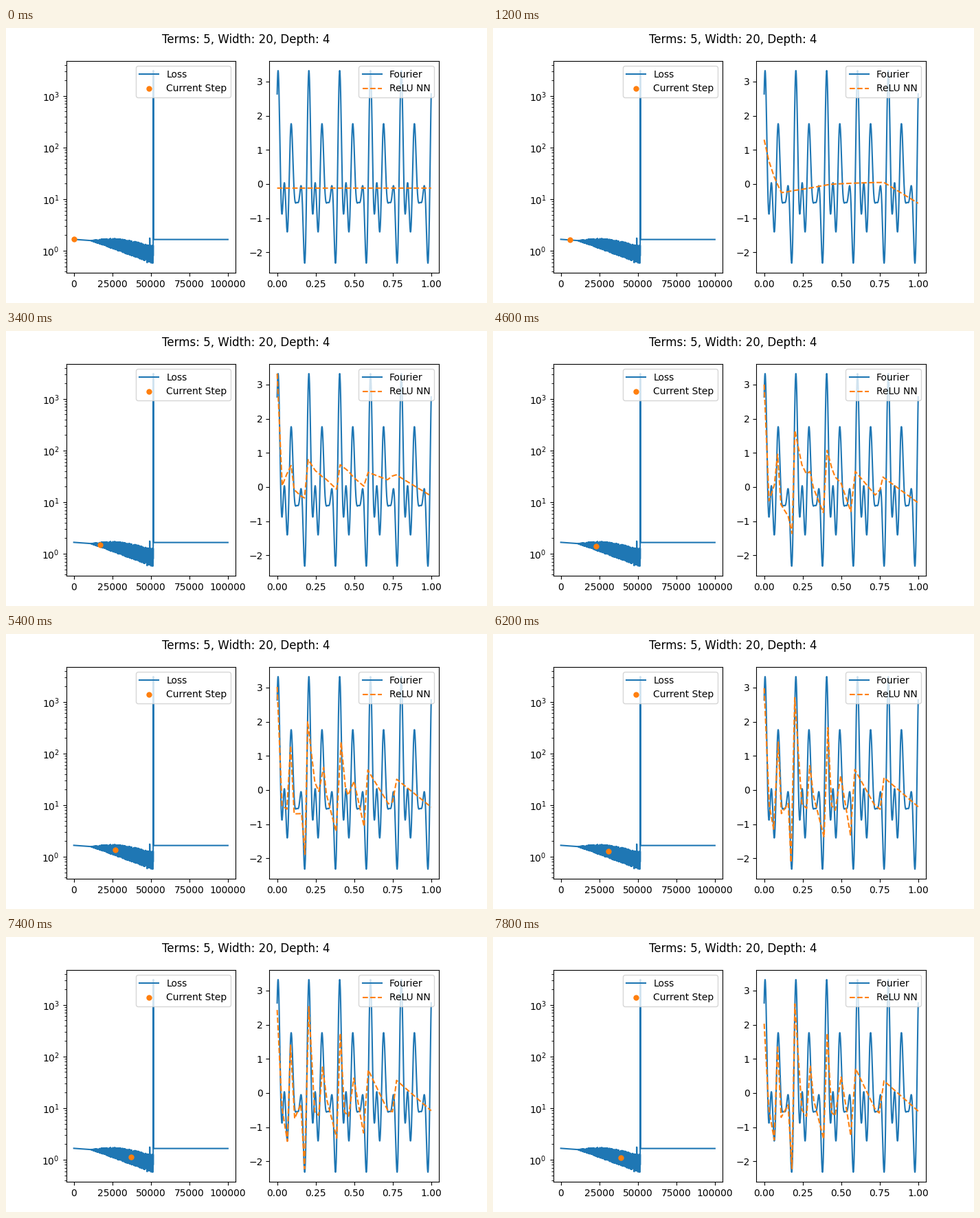
Recreate the animation shown at these times as a matplotlib script. Size 700 by 400 pixels, loop 8000 ms.

```python
import numpy as np
import matplotlib.pyplot as plt
from matplotlib.animation import FuncAnimation

FRAMES = 40
STEPS_PER_FRAME = 1000
PERIOD = 0.2
TERMS = 5


def smoothstep(u):
    u = np.clip(u, 0, 1)
    return u * u * (3 - 2 * u)


# --- Fourier series, solved from its turning points over one period ---
def basis(x):
    w = 2 * np.pi * np.arange(1, TERMS + 1) / PERIOD
    a = np.outer(x, w)
    value = np.hstack([np.ones((len(x), 1)), np.cos(a), np.sin(a)])
    slope = np.hstack([np.zeros((len(x), 1)), -w * np.sin(a), w * np.cos(a)])
    return value, slope


def fourier(x):
    turn_x = np.array([.0058, .0320, .0465, .0645, .0915, .1210, .1545, .1787])
    turn_y = [3.323, -.88, .05, -1.39, 1.76, -.56, -.05, -2.316]
    value, slope = basis(turn_x)
    start = basis(np.zeros(1))[0]
    rows = np.vstack([value, start, slope / 500])
    rhs = np.concatenate([turn_y, [2.63], np.zeros(len(turn_x))])
    coef = np.linalg.lstsq(rows, rhs, rcond=None)[0]
    return basis(x)[0] @ coef


# --- Network: a polyline whose corners grow as training goes on ---
# Main corners come first in training, details later.
main = np.array([(0, 2.8), (.03, -.45), (.09, 1.42), (.112, -.75), (.178, -2.2),
                 (.202, 2.65), (.385, -1.4), (.412, 1.78), (.562, -1.25),
                 (.59, .68), (.72, -.5), (.775, .36), (1, -.5)])
detail = np.array([(.065, -1.35), (.155, -.35), (.247, -.5), (.272, -.65),
                   (.298, .75), (.32, -.2), (.44, -.55), (.462, -.65),
                   (.5, .43), (.75, -.6)])
first_fit = np.array([(0, 1.17), (.047, .4), (.11, -.26), (.45, 0), (.8, .05), (1, -.57)])
FLAT = -.12


def network(frame):
    # The left end is learned sooner and faster than the rest.
    x = main[:, 0]
    near = np.minimum(x, .1)
    gain = smoothstep((frame - 4 - 60 * near) / (12 + 110 * near))
    early = FLAT + (np.interp(x, *first_fit.T) - FLAT) * min(frame / 6, 1)
    lift = .3 * np.exp(-((frame - 16) / 5) ** 2)
    y = early + (main[:, 1] - early) * gain + lift

    dx, dy = detail.T
    plain = np.interp(dx, x, y)
    if frame <= 6:
        plain = FLAT + (np.interp(dx, *first_fit.T) - FLAT) * frame / 6
    fine = plain + (dy - plain) * smoothstep((frame - 19) / 14)

    x, y = np.append(x, dx), np.append(y, fine)
    order = np.argsort(x)
    x, y = x[order], y[order]

    rng = np.random.default_rng(frame)
    wobble = smoothstep((frame - 6) / 12)
    x[1:-1] += wobble * rng.uniform(-.004, .004, len(x) - 2)
    y *= 1 + .05 * wobble * rng.normal(size=len(y))
    y[0] += .4 * wobble * rng.normal()
    return x, y


# --- Loss history: a widening noisy band, a spike, then a plateau ---
def band(step):
    """Lower and upper edge of log10(loss)."""
    k = step / 1000
    trend = .222 - .0022 * k
    low = trend - .0089 * np.maximum(k - 11, 0)
    high = trend + .075 * np.sin(np.pi * np.clip((k - 11) / 37, 0, 1))
    return low, high


def make_loss():
    step = np.arange(0, 100001, 25)
    low, high = band(step)
    logs = np.random.default_rng(4).uniform(low, high)
    logs[step == 47600] = -.229
    logs[step == 49300] = .245
    logs[step > 51500] = 3.490
    logs[step > 51700] = .219
    return step, 10 ** logs


fig, (ax_loss, ax_fit) = plt.subplots(1, 2, figsize=(7, 4), dpi=100)
fig.suptitle("Terms: 5, Width: 20, Depth: 4", x=.499)

ax_loss.plot(*make_loss(), label="Loss")
marker, = ax_loss.plot([0], [10 ** .222], "o", markeredgewidth=0, label="Current Step")
ax_loss.set_yscale("log")
ax_loss.legend(loc="upper right")

grid = np.linspace(0, 1, 1001)
ax_fit.plot(grid, fourier(grid), label="Fourier")
fit, = ax_fit.plot(*network(0), "--", label="ReLU NN")
ax_fit.legend(loc="upper right")


def update(frame):
    step = frame * STEPS_PER_FRAME
    marker.set_data([step], [10 ** np.mean(band(step))])
    fit.set_data(*network(frame))
    return marker, fit


anim = FuncAnimation(fig, update, frames=FRAMES, interval=200, repeat=True)
plt.show()
```
